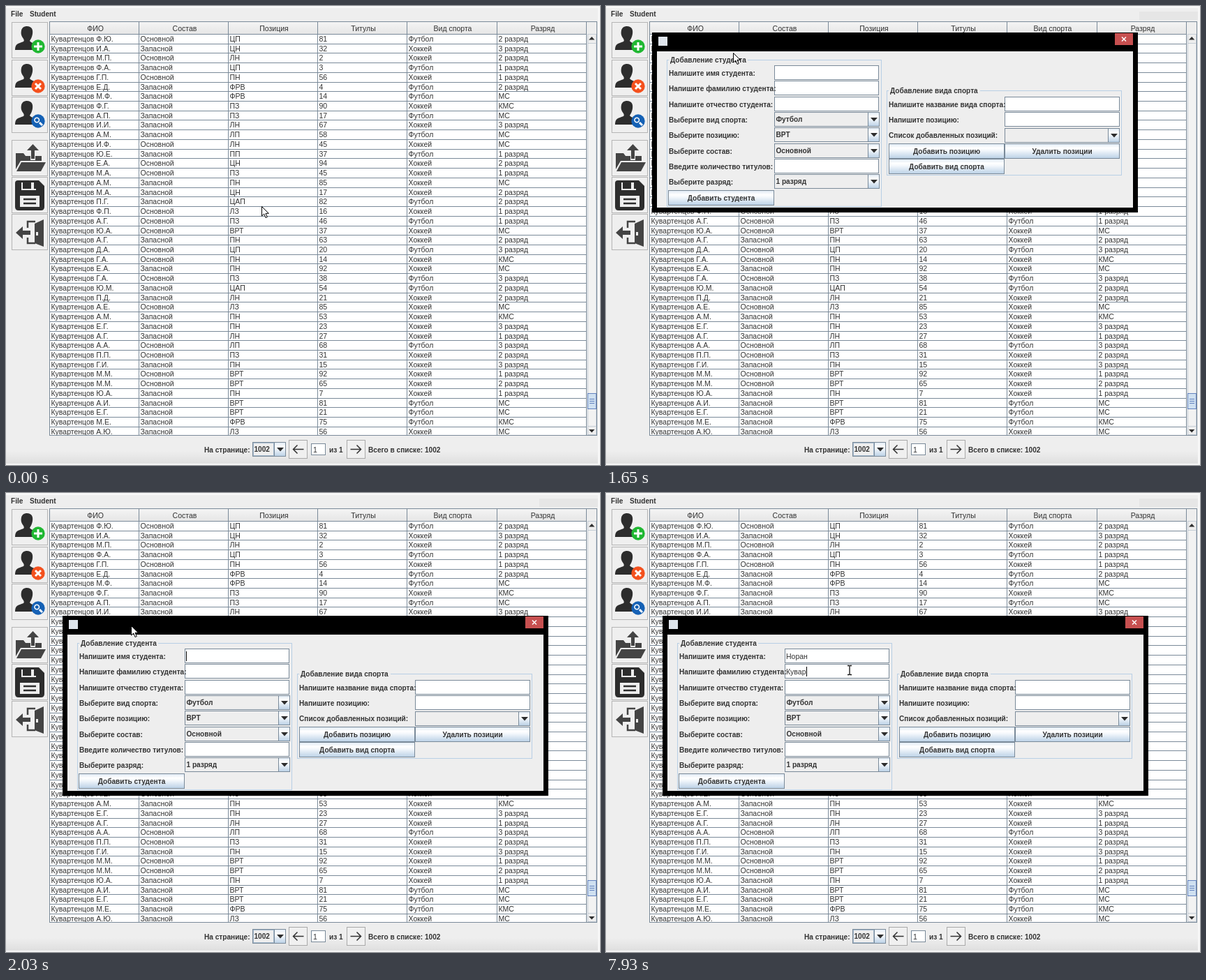
An HTML page with a canvas for the animation above (8000 ms loop, 851x658 px).

```html
<!DOCTYPE html>
<html lang="ru">
<head>
<meta charset="utf-8">
<style>
  html, body { margin: 0; width: 100%; height: 100%; overflow: hidden; background: #eee; }
  canvas { display: block; }
</style>
</head>
<body>
<canvas id="stage" width="851" height="658"></canvas>
<script>
const LOOP = 8000, W = 851, H = 658, DW = 696, DH = 258;
const LINE = '#7a8a99', INK = '#333', PANEL = '#eee', ICON = '#2d2d2d';
const PLAIN = '10.5px "Liberation Sans", Arial, sans-serif';
const BOLD = 'bold 10.1px "Liberation Sans", Arial, sans-serif';
const SURNAME = 'Кувартенцов', FIRST_NAME = 'Норан';

const HEADERS = ['ФИО', 'Состав', 'Позиция', 'Титулы', 'Вид спорта', 'Разряд'];
const WORDS = { О: 'Основной', З: 'Запасной', Ф: 'Футбол', Х: 'Хоккей' };
const ROWS = `Ф.Ю. О ЦП 81 Ф 2,И.А. З ЦН 32 Х 3,М.П. О ЛН 2 Х 2,Ф.А. З ЦП 3 Ф 1,Г.П. О ПН 56 Х 1,Е.Д. З ФРВ 4 Ф 2,
М.Ф. З ФРВ 14 Ф МС,Ф.Г. З ПЗ 90 Х КМС,А.П. З ПЗ 17 Ф МС,И.И. З ЛН 67 Х 3,А.М. З ЛП 58 Ф МС,И.Ф. О ЛН 45 Х МС,
Ю.Е. З ПП 37 Ф 1,Е.А. О ЦН 94 Х 2,М.А. О ПЗ 45 Х 1,А.М. З ПН 85 Х МС,М.А. З ЦН 17 Х 2,П.Г. З ЦАП 82 Ф 2,
Ф.П. О ЛЗ 16 Х 1,А.Г. О ПЗ 46 Ф 1,Ю.А. О ВРТ 37 Х МС,А.Г. З ПН 63 Х 2,Д.А. О ЦП 20 Ф 3,Г.А. О ПН 14 Х КМС,
Е.А. З ПН 92 Х МС,Г.А. О ПЗ 38 Ф 3,Ю.М. З ЦАП 54 Ф 2,П.Д. З ЛН 21 Х 2,А.Е. О ЛЗ 85 Х МС,А.М. З ПН 53 Х КМС,
Е.Г. З ПН 23 Х 3,А.Г. З ЛН 27 Х 1,А.А. О ЛП 68 Ф 3,П.П. О ПЗ 31 Х 2,Г.И. З ПН 15 Х 3,М.М. О ВРТ 92 Х 1,
М.М. О ВРТ 65 Х 2,Ю.А. З ПН 7 Х 1,А.И. З ВРТ 81 Ф МС,Е.Г. З ВРТ 21 Ф МС,М.Е. З ФРВ 75 Ф КМС,А.Ю. З ЛЗ 56 Х МС`
  .split(',').map(row => row.trim().split(' '));

const stage = document.getElementById('stage').getContext('2d');
let g = stage;

function layer(width, height, draw) {
  const canvas = document.createElement('canvas');
  canvas.width = width;
  canvas.height = height;
  g = canvas.getContext('2d');
  draw();
  g = stage;
  return canvas;
}

function box(x, y, w, h, fill, border) {
  if (fill) { g.fillStyle = fill; g.fillRect(x, y, w, h); }
  if (border) { g.strokeStyle = border; g.lineWidth = 1; g.strokeRect(x + .5, y + .5, w - 1, h - 1); }
}

function text(str, x, middle, font = BOLD, align = 'left', color = INK) {
  g.font = font;
  g.textAlign = align;
  g.fillStyle = color;
  g.fillText(str, x, Math.round(middle + 4));
}

function shape(d, fill, stroke, width = 1) {
  const path = new Path2D(d);
  if (fill) { g.fillStyle = fill; g.fill(path); }
  if (stroke) { g.strokeStyle = stroke; g.lineWidth = width; g.stroke(path); }
}

function at(x, y, draw) {
  g.save();
  g.translate(x, y);
  draw();
  g.restore();
}

function shade(y, h, ...stops) {
  const gradient = g.createLinearGradient(0, y, 0, y + h);
  stops.forEach(([pos, color]) => gradient.addColorStop(pos, color));
  return gradient;
}

const glossy = (y, h) => shade(y, h, [0, '#dde8f3'], [.3, '#fff'], [.45, '#f4f8fc'], [1, '#b8cfe5']);

function button(label, x, y, w) {
  box(x, y, w, 22, glossy(y, 22), LINE);
  text(label, x + w / 2, y + 11, BOLD, 'center');
}

function combo(value, x, y, w) {
  box(x, y, w, 21, PANEL, LINE);
  box(x + w - 17, y, 17, 21, glossy(y, 21), LINE);
  const cx = x + w - 8;
  shape(`M${cx - 5} ${y + 8}h10l-5 5.5z`, ICON);
  text(value, x + 2.5, y + 10);
}

const field = (x, y, w, h = 21) => box(x, y, w, h, '#fff', LINE);

function person(badge, badgeY, sign) {
  shape('M22 6C29 6 31 11 30 17C29 23 27 25 26 27C28 31 38 30 39 38L39 40H5C5 31 9 31 17 28C18 27 18 26 17 24C14 20 13 17 14 12C15 8 18 6 22 6Z', ICON);
  g.beginPath();
  g.arc(38, badgeY, 9.7, 0, 7);
  g.fillStyle = badge;
  g.fill();
  at(38, badgeY, () => shape(sign, null, '#fff', 3));
}

const ICONS = [
  [23, () => person('#20b832', 35, 'M-6 0H6M0-6V6')],
  [77, () => person('#f4511e', 38, 'M-4-4L4 4M4-4L-4 4')],
  [130, () => {
    person('#1561b5', 35, 'M2 2L6 6');
    shape('M39.5 33.5a3.3 3.3 0 1 1-6.6 0a3.3 3.3 0 1 1 6.6 0', null, '#fff', 1.5);
  }],
  [192, () => {
    shape('M6 42V19H17L20 23H27V29H34V23H43V30H13Z', '#444');
    shape('M14 32H49L42 45H7Z', '#444');
    shape('M28 27V15H22L30.5 6L39 15H33V27Z', '#444');
  }],
  [245, () => {
    shape('M9 5h30l8 8v30q0 5-5 5H10q-5 0-5-5V9q0-4 4-4z', ICON);
    shape('M14 8h21v11H14zM12 27h28v16H12z', PANEL);
    shape('M16 8h12v9H16zM32 8h3v9h-3z', ICON);
    shape('M17 32h18M17 38h18', null, ICON, 2.5);
  }],
  [298, () => {
    shape('M6 27l10-9v6h11v6H16v6z', '#444');
    shape('M23 20V11H34M23 34V42H34', null, '#444', 2.5);
    shape('M33 14L46 8V47L33 42Z', '#444');
    shape('M35 26h3v5h-3z', PANEL);
  }],
];

function pageButton(x, arrow) {
  box(x, 622, 27, 27, '#f0f0f0', '#a9a9a9');
  at(x + 13.5, 635.5, () => shape(arrow, null, INK, 1.5));
}

function drawTable() {
  const colX = i => 63 + Math.round(i * 128.1);
  box(62, 22, 785, 594, PANEL, LINE);
  box(63, 40, 769, 575, '#fff');
  box(63, 23, 769, 17, shade(23, 17, [0, '#f4f4f4'], [1, '#e6e6e6']));
  HEADERS.forEach((title, i) => text(title, colX(i) + 65, 32, PLAIN, 'center'));

  g.save();
  g.beginPath();
  g.rect(63, 23, 769, 592);
  g.clip();
  ROWS.forEach(([initials, squad, position, titles, sport, rank], k) => {
    const y = 39.9 + k * 13.73;
    box(63, Math.round(y), 769, 1, LINE);
    [`${SURNAME} ${initials}`, WORDS[squad], position, titles, WORDS[sport], +rank ? `${rank} разряд` : rank]
      .forEach((value, i) => text(value, colX(i) + 1.5, y + 7, PLAIN));
  });
  g.restore();
  for (let i = 1; i < 7; i++) box(colX(i) - 1, 23, 1, 592, LINE);

  box(833, 40, 13, 575, '#f2f2f2', '#c5cdd6');
  box(833, 40, 13, 14, PANEL, '#c5cdd6');
  box(833, 602, 13, 13, PANEL, '#c5cdd6');
  shape('M835 48.5l4.2-4.5l4.2 4.5zM835 607l4.2 4.5l4.2-4.5z', ICON);
  box(833, 555, 13, 23, '#cfe0f0', '#6382bf');
  shape('M836 563.5h7M836 566.5h7M836 569.5h7', null, '#6382bf');
}

const base = layer(W, H, () => {
  box(0, 0, W, H, PANEL);
  box(0, 0, W, 3, '#f8f8f8');
  box(0, 638, W, 18, shade(638, 18, [0, PANEL], [1, '#dfdfdf']));
  box(0, 656, W, 2, '#f7f7f7');
  box(848, 0, 3, H, '#f7f7f7');
  text('File', 7, 11);
  text('Student', 34, 11);
  ICONS.forEach(([y, draw]) => {
    box(8, y, 52, 52, '#efefef', '#b5b5b5');
    at(8, y, draw);
  });
  drawTable();
  text('На странице:', 284, 636);
  combo('1002', 353, 625, 48);
  box(354, 626, 30, 19, null, '#a3b8cc');
  pageButton(405, 'M8 0H-7M-1-6L-7 0L-1 6');
  field(437, 627, 21, 17);
  text('1', 440, 636, PLAIN);
  text('из 1', 463, 636);
  pageButton(488, 'M-8 0H7M1-6L7 0L1 6');
  text('Всего в списке: 1002', 519, 636);
});

const rowY = i => 47 + i * 22.3;

function group(title, x, y, w, h, titleX, titleW) {
  box(x, y, w, h, null, '#b8cfe5');
  box(titleX - 2, y - 2, titleW, 5, PANEL);
  text(title, titleX, y - .5);
}

const dialog = layer(DW, DH, () => {
  box(0, 0, DW, DH, '#000');
  box(7, 27, 682, 224, PANEL);
  box(9, 6, 13, 13, '#dfe5ec');
  box(663, 1, 26, 17, '#c75050');
  shape('M673 6.5l6 6M679 6.5l-6 6', null, '#fff', 1.5);

  group('Добавление студента', 21, 39, 308, 211, 26, 113);
  [['Напишите имя студента:'], ['Напишите фамилию студента:'], ['Напишите отчество студента:'],
   ['Выберите вид спорта:', 'Футбол'], ['Выберите позицию:', 'ВРТ'], ['Выберите состав:', 'Основной'],
   ['Введите количество титулов:'], ['Выберите разряд:', '1 разряд']].forEach(([label, value], i) => {
    const y = Math.round(rowY(i));
    value ? combo(value, 175, y, 151) : field(175, y, 150);
    text(label, 24, y + 11);
  });
  button('Добавить студента', 23, 226, 152);

  group('Добавление вида спорта', 336, 83, 337, 122, 341, 131);
  field(505, 92, 165);
  field(505, 114, 165);
  combo('', 505, 137, 165);
  text('Напишите название вида спорта:', 339, 103);
  text('Напишите позицию:', 339, 125);
  text('Список добавленных позиций:', 339, 147);
  button('Добавить позицию', 339, 159, 166);
  button('Удалить позиции', 505, 159, 165);
  button('Добавить вид спорта', 339, 181, 166);
});

// Tracks are lists of [time, x, y], joined by straight runs.
const DIALOG_TRACK = [[1525, -20, -54], [1570, 12, -20], [1650, 66, 38], [1720, 92, 66], [1800, 107, 95],
  [1910, 100, 138], [2030, 81, 176]];
const POINTER_TRACK = [[200, 366, 287], [330, 270, 200], [480, 110, 95], [640, 40, 52], [800, 38, 48],
  [980, 82, 27], [1220, 79, -25], [1520, 78, -40], [1570, 120, 8], [1650, 182, 67], [1720, 198, 94],
  [1800, 206, 117], [1910, 199, 156], [2030, 179, 190], [2190, 179, 190], [2400, 232, 214], [2680, 290, 241],
  [2860, 290, 241], [2990, 336, 228], [5789, 336, 228], [5790, 337, 227], [5970, 337, 227], [6150, 394, 233],
  [6300, 403, 250], [6500, 370, 256], [6740, 349, 254]];

function follow(track, t) {
  const next = track.findIndex(key => key[0] > t);
  if (next < 0) return track[track.length - 1].slice(1);
  if (!next) return track[0].slice(1);
  const [t0, x0, y0] = track[next - 1], [t1, x1, y1] = track[next];
  const p = (t - t0) / (t1 - t0);
  return [x0 + (x1 - x0) * p, y0 + (y1 - y0) * p];
}

const typed = (str, times, t) => str.slice(0, times.filter(time => t >= time).length);
const FIRST_TIMES = [4190, 4350, 4480, 5150, 5310];
const LAST_TIMES = [7360, 7450, 7630, 7690, 7930];
const CARET_OFF = [[0, 1655], [2150, 2650], [3150, 3630], [4130, 4190], [4970, 5150], [5820, 6340], [6840, 7360]];

// The opening window tilts towards the viewer, so each row gets its own width.
function drawOpening(t) {
  const left = Math.exp((980 - t) / 70);
  const scaleY = 1 - .0235 * left, centerY = 75 - 2.6 * left;
  g.globalAlpha = 1 - .21 * Math.exp((980 - t) / 50);
  for (let y = 0; y < 206; y++) {
    const v = (y + .5 - centerY) / scaleY;
    if (v > DH / 2) break;
    const scaleX = 1 - (.0255 + .00009 * v) * left;
    g.drawImage(dialog, 0, Math.min(v + DH / 2 - .5, DH - 1), DW, 1, 328 - left - DW / 2 * scaleX, y, DW * scaleX, 1);
  }
  g.globalAlpha = 1;
}

function drawDialog(t) {
  const [x, y] = follow(DIALOG_TRACK, t).map(Math.round);
  at(x, y, () => {
    g.drawImage(dialog, 0, 0);
    const values = [typed(FIRST_NAME, FIRST_TIMES, t), typed(SURNAME, LAST_TIMES, t)];
    values.forEach((value, i) => text(value, 177, 58 + i * 22, PLAIN));
    if (CARET_OFF.some(([from, to]) => t >= from && t < to)) return;
    const active = t < 6340 ? 0 : 1;
    box(177 + Math.round(g.measureText(values[active]).width), 51 + active * 22, 1, 14, '#000');
  });
}

function drawPointer(t) {
  const [x, y] = follow(POINTER_TRACK, t).map(Math.round);
  at(x, y, () => {
    if (t < 2560) shape('M.5 .5V14L3.7 11L6 16.5L8.3 15.5L6 10.3H10.3Z', '#fff', '#000');
    else shape('M-3 -6.5H-1L0 -6L1 -6.5H3M0 -6V6M-3 6.5H-1L0 6L1 6.5H3', null, '#111', 1.3);
  });
}

function frame(now) {
  const t = now % LOOP;
  g.drawImage(base, 0, 0);
  if (t >= 1560) box(764, 8, 84, 12, '#e6e6e6');
  if (t >= 1270) drawDialog(t);
  else if (t >= 940) drawOpening(t);
  drawPointer(t);
  requestAnimationFrame(() => frame(performance.now() - start));
}

const start = performance.now();
frame(0);
</script>
</body>
</html>
```
